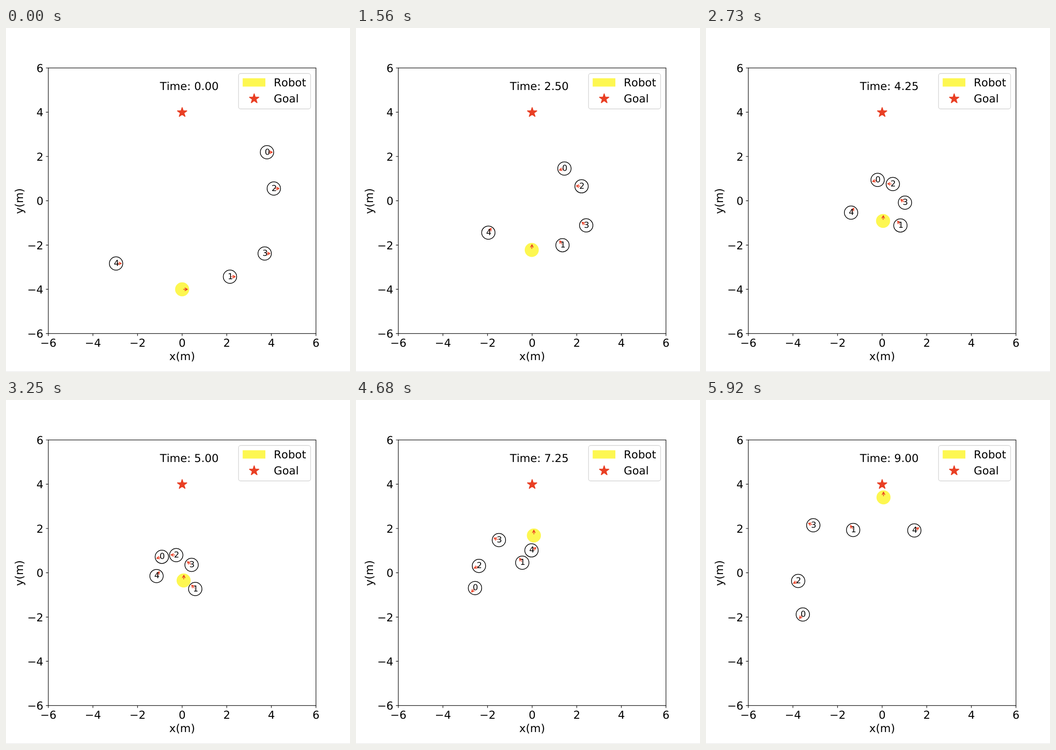
An HTML page that plays this animation: 748x749 px, repeating every 5990 ms.

```html
<!DOCTYPE html>
<html lang="en">
<head>
<meta charset="utf-8">
<title>Robot navigation plot</title>
<style>
html, body { margin: 0; width: 100%; height: 100%; overflow: hidden; background: #fff; }
svg { display: block; width: 748px; height: 749px; }
text { font: 23.84px "DejaVu Sans", sans-serif; font-kerning: none; text-rendering: geometricPrecision; }
.mid { text-anchor: middle; }
.end { text-anchor: end; }
.id { font-size: 17.9px; }
.axis { fill: none; stroke: #000; stroke-width: 1.2; }
.agent { fill: none; stroke: #000; stroke-width: 1.5; }
.robot { fill: #fdf751; stroke: #fdf751; stroke-width: 1.5; }
.arrow { fill: none; stroke: #e93f24; stroke-width: 1.5; stroke-linecap: round; stroke-linejoin: round; }
.star { fill: #e93f24; stroke: #e93f24; stroke-width: 1.5; stroke-linejoin: bevel; }
</style>
</head>
<body>
<svg viewBox="0 0 748 749">
  <rect y="748" width="748" height="1" fill="#e4e4e4"/>
  <g id="bodies"></g>
  <g id="ticks"></g>
  <rect class="axis" x="92" y="87" width="582" height="578.3"/>
  <text class="mid" x="383" y="723">x(m)</text>
  <text class="mid" transform="translate(37 376.8) rotate(-90)">y(m)</text>
  <g id="labels"></g>
  <text id="clock" x="334.7" y="135.2">Time: 0.00</text>
  <rect x="505.6" y="99" width="156.8" height="77.2" rx="4.8" fill="#fff" fill-opacity=".8" stroke="#d4d4d4" stroke-width="1.4"/>
  <rect class="robot" x="515.4" y="110.2" width="47.8" height="16.6"/>
  <text x="582.3" y="126.8">Robot</text>
  <text x="582.3" y="162">Goal</text>
  <g id="stars"></g>
</svg>
<script>
const LOOP = 5990, FRAME = 65, LAST = 36;
const $ = id => document.getElementById(id);

// Turning points [step, x, y], joined by straight runs; the robot comes last.
const routes = [
  [[0, 567.5, 270.5], [22.7, 308, 351], [32, 235.3, 437.3], [36, 210.5, 467]],
  [[0, 487, 541.5], [6, 464, 497.5], [20, 411.5, 411.5], [28, 367.5, 364.5], [36, 320, 283]],
  [[0, 582.3, 349.5], [8, 514.5, 346], [24, 322, 335], [32, 234.5, 377], [36, 200.4, 394]],
  [[0, 562.5, 491], [8, 520, 444], [25, 355, 323.5], [36, 233.3, 272.7]],
  [[0, 239.3, 512.7], [6, 272, 470.5], [26, 351, 346], [36, 453, 284]],
  [[0, 383, 569], [6, 380.5, 519.3], [23, 387.5, 366], [36, 386, 212]]
];

function add(parent, name, attrs, text) {
  const el = document.createElementNS("http://www.w3.org/2000/svg", name);
  for (const key in attrs) el.setAttribute(key, attrs[key]);
  if (text !== undefined) el.textContent = text;
  return $(parent).appendChild(el);
}

function addStar(cx, cy) {
  const points = Array.from({ length: 10 }, (_, i) => {
    const r = i % 2 ? 4.27 : 11.18, a = i * Math.PI / 5;
    return `${cx + r * Math.sin(a)},${cy - r * Math.cos(a)}`;
  });
  add("stars", "polygon", { class: "star", points: points.join(" ") });
}

function addTicks() {
  for (let v = -6; v <= 6; v += 2) {
    const x = 383 + v * 48.5, y = 376.15 - v * 48.19;
    const label = String(v).replace("-", "\u2212");
    add("ticks", "path", { class: "axis", d: `M${x} 665.3v5.2M92 ${y}h-5.2` });
    add("ticks", "text", { class: "mid", x, y: 694 }, label);
    add("ticks", "text", { class: "end", x: 81.3, y: y + 9 }, label);
  }
}

// Place and heading on a route; everyone faces right before setting off.
function pose(route, step) {
  let i = 1;
  while (i < route.length - 1 && step >= route[i][0]) i++;
  const [s0, x0, y0] = route[i - 1], [s1, x1, y1] = route[i];
  const u = (step - s0) / (s1 - s0), dx = x1 - x0, dy = y1 - y0;
  return {
    x: x0 + dx * u,
    y: y0 + dy * u,
    angle: step ? Math.atan2(dy, dx) * 180 / Math.PI : 0
  };
}

addTicks();
addStar(383, 183.8);
addStar(539.6, 154);

const bodies = routes.map((route, i) => {
  const isRobot = i === routes.length - 1;
  return {
    route,
    disc: add("bodies", "ellipse", { class: isRobot ? "robot" : "agent", rx: 14.55, ry: 14.46 }),
    arrow: add("bodies", "path", { class: "arrow", d: "M3 0H11.6M6 -3L11.6 0L6 3" }),
    label: isRobot ? null : add("labels", "text", { class: "id" }, i)
  };
});

let shown = -1;

function draw(step) {
  for (const { route, disc, arrow, label } of bodies) {
    const { x, y, angle } = pose(route, step);
    disc.setAttribute("transform", `translate(${x} ${y})`);
    arrow.setAttribute("transform", `translate(${x} ${y}) rotate(${angle})`);
    if (label) label.setAttribute("transform", `translate(${x - 4.85} ${y + 5})`);
  }
  $("clock").textContent = `Time: ${(step / 4).toFixed(2)}`;
}

// The simulation advances by 0.25 s every two and a half frames.
function tick(now) {
  const frame = Math.floor(Math.floor(now % LOOP / 10) * 10 / FRAME);
  const step = Math.min(LAST, Math.floor((frame + 1.1) / 2.5));
  if (step !== shown) draw(shown = step);
}

let start;
function loop(now) {
  start ??= now;
  tick(now - start);
  requestAnimationFrame(loop);
}
tick(0);
requestAnimationFrame(loop);
</script>
</body>
</html>
```
